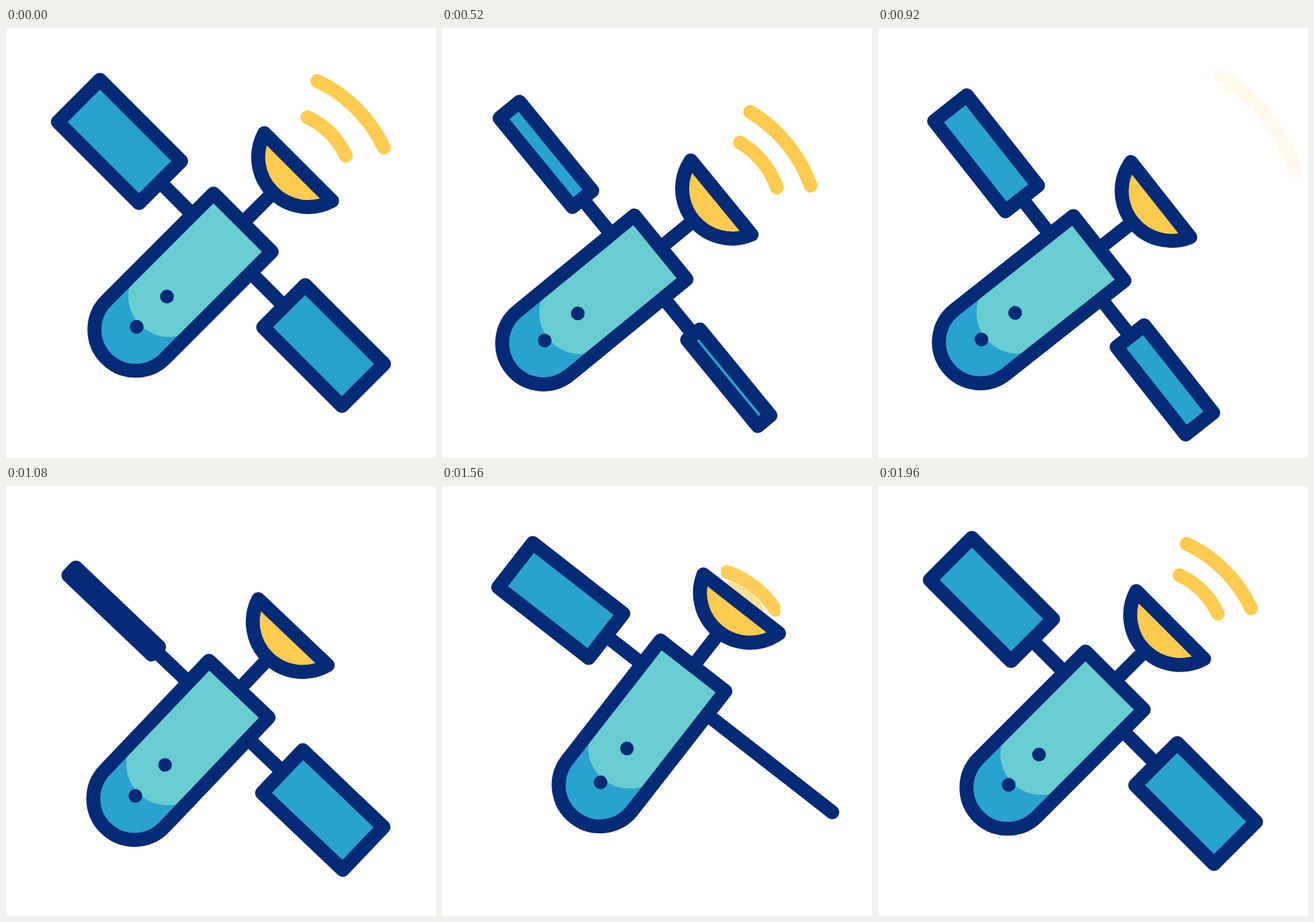
These frames come from a looping animation (640 by 640 pixels, 2 s). An HTML page:

```html
<!DOCTYPE html>
<html lang="en">
<head>
<meta charset="utf-8">
<title>Satellite</title>
<style>
  html, body { margin: 0; width: 100%; height: 100%; overflow: hidden; background: #fff; }
  svg { display: block; width: 100vw; height: 100vh; }
  .line { fill: none; stroke: #032a75; stroke-width: 20.8; stroke-linecap: round; stroke-linejoin: round; }
  .blue { fill: #29a2ce; }
  .teal { fill: #68cdd1; }
  .gold { fill: #ffcb50; }
  .navy { fill: #032a75; }
  .wave { fill: none; stroke: #ffcb50; stroke-width: 20.5; stroke-linecap: round; }
</style>
</head>
<body>
<svg viewBox="0 0 640 640">
  <clipPath id="window"><rect id="clip" width="640" height="640"/></clipPath>
  <g clip-path="url(#window)">
    <g class="craft">
      <path id="inner" class="wave"/>
      <path id="outer" class="wave"/>
    </g>
  </g>
  <g class="craft">
    <path class="line" d="M-128 0H-60M62.6 0H133M1.8 -107V-44"/>
    <path id="left" class="line blue"/>
    <path id="right" class="line blue"/>
    <path class="line gold" d="M-70 -161.2A74.3 74.3 0 0 0 72.6 -161.2Z"/>
    <path class="blue" d="M-60 -44.2H62.6V181A61.3 61.3 0 0 1 -60 181Z"/>
    <path class="teal" d="M-60 -44.2H62.6V109.8A61.3 61.3 0 0 1 -60 109.8Z"/>
    <path class="line" d="M-60 -44.2H62.6V181A61.3 61.3 0 0 1 -60 181Z"/>
    <circle class="navy" cx="-.5" cy="113.2" r="10.2"/>
    <circle class="navy" cx="-.5" cy="177" r="10.2"/>
  </g>
</svg>
<script>
const LOOP = 2000, STEP = 40;
const byId = id => document.getElementById(id);
const crafts = document.querySelectorAll('.craft');

const linear = u => u;
const smooth = u => u * u * (3 - 2 * u);
const smoother = u => u * u * u * (10 - 15 * u + 6 * u * u);

// Eases between [time, value] keys and holds the end values.
function track(t, ease, ...keys) {
  const next = keys.findIndex(key => t < key[0]);
  if (next === 0) return keys[0][1];
  if (next < 0) return keys[keys.length - 1][1];
  const [t0, a] = keys[next - 1], [t1, b] = keys[next];
  return a + (b - a) * ease((t - t0) / (t1 - t0));
}

// A panel alternates between face-on and edge-on.
const turn = (t, ...times) => track(t, smooth, ...times.map((time, i) => [time, 1 - i % 2]));

function drawPanel(id, x1, x2, factor) {
  const h = 44.3 * factor;
  byId(id).setAttribute('d', `M${x1} ${-h}H${x2}V${h}H${x1}Z`);
}

// The arc widens with its distance from the craft.
function drawWave(id, x, distance, spread, alpha) {
  const half = distance * spread[0] + spread[1], sag = half * .175;
  const r = (half * half + sag * sag) / (2 * sag);
  byId(id).setAttribute('d', `M${x - half} ${-distance}A${r} ${r} 0 0 1 ${x + half} ${-distance}`);
  byId(id).setAttribute('opacity', alpha);
  return half;
}

function draw(t) {
  const back = track(t, smooth, [0, 0], [750, 57.8], [1430, -36], [1970, 0]);
  const side = track(t, smooth, [0, 0], [1200, 6.2], [1400, 6.2], [1960, 0]);
  const angle = 45 + track(t, smoother, [80, 0], [800, 8.1], [1330, -9.1], [2000, 0]);
  const x = 320 + (side - back) * Math.SQRT1_2;
  const y = 320 + (side + back) * Math.SQRT1_2;
  for (const g of crafts) g.setAttribute('transform', `translate(${x} ${y}) rotate(${angle})`);

  drawPanel('left', -299.2, -128.2, turn(t, 0, 320, 760, 1200, 1620));
  drawPanel('right', 133, 298.8, turn(t, 200, 690, 1100, 1560, 1960));

  const near = track(t, linear, [460, 223.3], [900, 307], [1440, 150], [1920, 223.3]);
  const nearAlpha = track(t, linear, [720, 1], [920, 0], [1440, 0], [1640, 1]);
  drawWave('inner', -1, near, [.26, -17.7], nearAlpha);

  const far = track(t, linear, [500, 271.8], [940, 349], [1400, 154], [2000, 271.8]);
  const farAlpha = track(t, linear, [750, 1], [940, 0], [1400, 0], [1570, 1]);
  const half = drawWave('outer', 1, far, [.28, -6.1], farAlpha);

  // Emerging waves are cut off by upright sides.
  const emerging = t > 1400 && nearAlpha < 1;
  const a = angle * Math.PI / 180;
  const reach = emerging ? half * Math.cos(a) + 7.9 : 640;
  byId('clip').setAttribute('x', x + far * Math.sin(a) - reach);
  byId('clip').setAttribute('width', 2 * reach);
}

const start = performance.now();
function tick() {
  const t = (performance.now() - start) % LOOP;
  draw(Math.floor(t / STEP) * STEP);
  requestAnimationFrame(tick);
}
tick();
</script>
</body>
</html>
```
